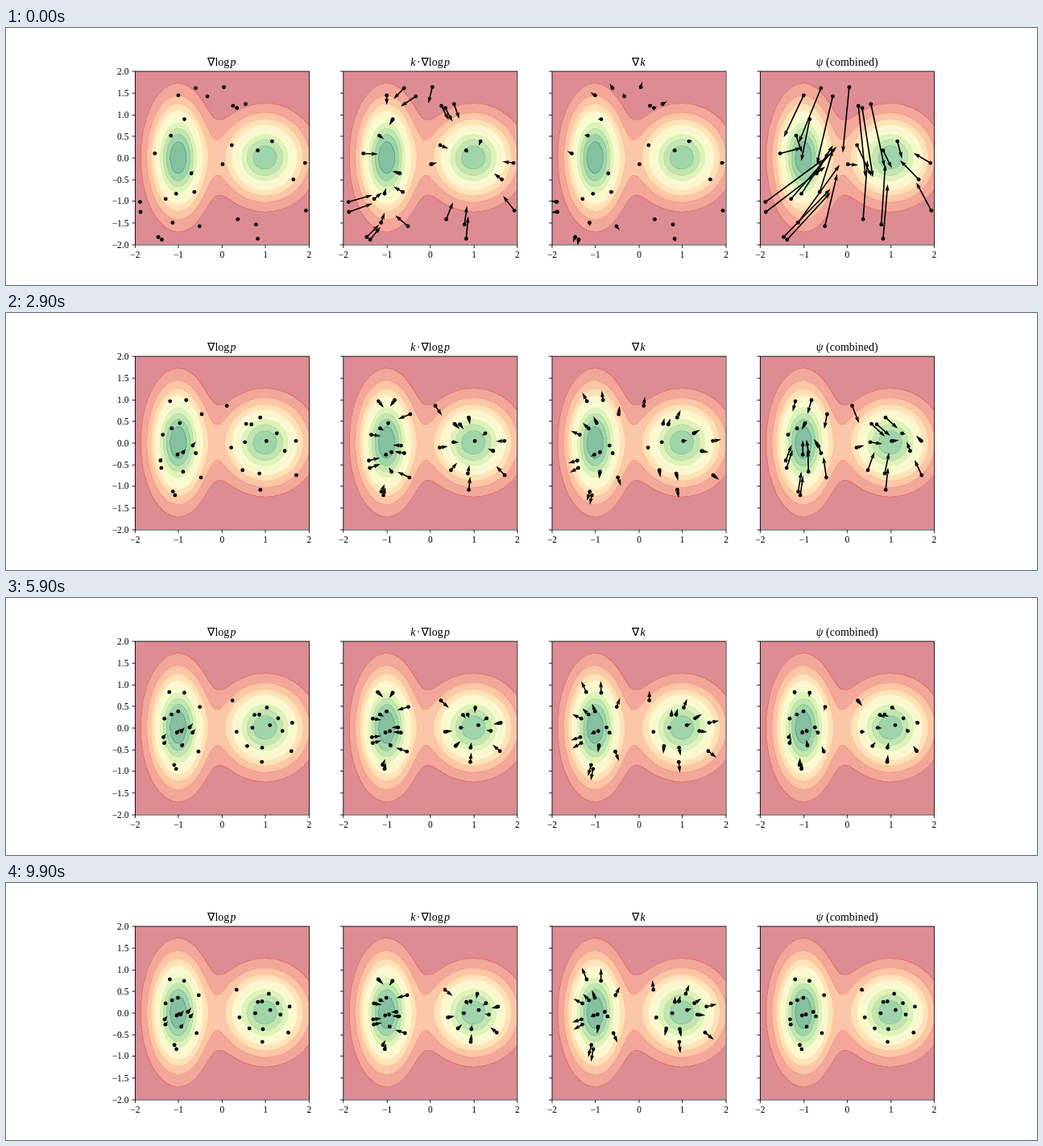
Write an HTML page with a canvas that moves like this. It is 1280 px wide and 320 px high and loops after 10000 ms.

```html
<!DOCTYPE html>
<html lang="en">
<head>
<meta charset="utf-8">
<title>Particle flow</title>
<style>
  html, body { margin: 0; width: 1280px; height: 320px; overflow: hidden; background: #fff; }
  canvas { display: block; }
</style>
</head>
<body>
<canvas id="stage" width="1280" height="320"></canvas>
<script>
const STEPS = 100, STEP_MS = 100, STEP_SIZE = 0.0031;
const BANDWIDTH = 1.1, REPULSION = 0.57;

// The figure is laid out on 1600 x 400 and shown at 80 %
const ZOOM = 0.8, SIZE = 1240 / 4.6, UNIT = SIZE / 4, GAP = SIZE * 1.2;
const LEFT = 200, TOP = 202 - SIZE / 2, ARROW = UNIT / 10, SHAFT = 0.0075 * SIZE;

const start = [
  [-1, 1.44], [-.6, 1.61], [-.33, 1.42], [.05, 1.63], [.26, 1.2], [.35, 1.15],
  [.55, 1.24], [-.86, .89], [-1.17, .51], [-1.54, .1], [.23, .29], [.83, .17],
  [1.16, .38], [1.92, -.12], [1.65, -.5], [.02, -.15], [-.7, -.36], [-.63, -.79],
  [-1.05, -.83], [-1.29, -.95], [-1.88, -1.02], [-1.87, -1.25], [-1.13, -1.5], [-.51, -1.58],
  [-1.46, -1.83], [-1.38, -1.89], [.37, -1.42], [.79, -1.54], [.83, -1.87], [1.94, -1.22]
];

// Two equally weighted Gaussians, measured in contour levels of 0.025
const gaussian = (x, y, sx, sy) =>
  Math.exp(-x * x / (2 * sx * sx) - y * y / (2 * sy * sy)) / (4 * Math.PI * sx * sy * 0.025);
const leftMode = (x, y) => gaussian(x + 1, y, .4, .8);
const rightMode = (x, y) => gaussian(x - 1, y, .6, .6);

function score([x, y]) {
  const l = leftMode(x, y), r = rightMode(x, y), w = l / (l + r);
  return [
    -w * (x + 1) / .16 - (1 - w) * (x - 1) / .36,
    -w * y / .64 - (1 - w) * y / .36
  ];
}

// Each particle is drawn by its neighbours' scores and pushed away from them
function forces(points) {
  const scores = points.map(score);
  return points.map(([x, y], i) => {
    const push = [0, 0], pull = [0, 0];
    points.forEach(([u, v], j) => {
      const dx = x - u, dy = y - v, k = Math.exp(-(dx * dx + dy * dy) / BANDWIDTH);
      push[0] += REPULSION * k * dx;
      push[1] += REPULSION * k * dy;
      pull[0] += k * scores[j][0];
      pull[1] += k * scores[j][1];
    });
    return { own: scores[i], push, total: [pull[0] + push[0], pull[1] + push[1]] };
  });
}

function simulate() {
  const states = [];
  for (let points = start; states.length < STEPS;) {
    const field = forces(points);
    states.push({ points, field });
    points = points.map(([x, y], i) => {
      const [vx, vy] = field[i].total;
      return [x + STEP_SIZE * vx, y + STEP_SIZE * vy];
    });
  }
  return states;
}

function contourImage() {
  const ramp = ['#a50026', '#d73027', '#f46d43', '#fdae61', '#fee08b', '#ffffbf',
    '#d9ef8b', '#a6d96a', '#66bd63', '#1a9850', '#006837']
    .map(hex => [1, 3, 5].map(at => parseInt(hex.slice(at, at + 2), 16)));
  const mix = (a, b) => a.map((c, i) => (c + b[i]) / 2);
  const bands = ramp.slice(1).map((c, i) => mix(c, ramp[i]));
  const tints = bands.map(c => mix(c, [255, 255, 255]));
  const pixels = Math.ceil(SIZE);
  const bandAt = (i, j) => {
    const x = (i + .5) / pixels * 4 - 2, y = 2 - (j + .5) / pixels * 4;
    return Math.floor(leftMode(x, y) + rightMode(x, y));
  };
  const canvas = document.createElement('canvas');
  canvas.width = canvas.height = pixels;
  const c = canvas.getContext('2d'), img = c.createImageData(pixels, pixels);
  for (let j = 0; j < pixels; j++) for (let i = 0; i < pixels; i++) {
    const near = [bandAt(i, j), bandAt(i + 1, j), bandAt(i, j + 1)];
    const low = Math.min(...near), high = Math.max(...near);
    // neighbouring translucent bands overlap along their seam
    const color = low === high ? tints[low] : mix(bands[high], tints[low]);
    img.data.set([...color, 255], 4 * (j * pixels + i));
  }
  c.putImageData(img, 0, 0);
  return canvas;
}

function scaledContext(canvas) {
  canvas.width = 1280;
  canvas.height = 320;
  const c = canvas.getContext('2d');
  c.scale(ZOOM, ZOOM);
  return c;
}

const SERIF = '"Liberation Serif", "Noto Serif", serif';
// Single letters are variables and set in italics
const titles = [
  ['∇log\u200a', 'p'],
  ['k', '\u200a·\u200a∇log\u200a', 'p'],
  ['∇\u200a', 'k'],
  ['ψ', ' (combined)']
];

function drawTitle(c, parts, center) {
  const setFont = text => c.font = `${text.length === 1 ? 'italic ' : ''}17.5px ${SERIF}`;
  const widths = parts.map(text => (setFont(text), c.measureText(text).width));
  let x = center - widths.reduce((a, b) => a + b) / 2;
  c.textAlign = 'left';
  parts.forEach((text, i) => {
    setFont(text);
    c.fillText(text, x, TOP - 8.3);
    x += widths[i];
  });
}

function drawBackdrop() {
  const canvas = document.createElement('canvas');
  const c = scaledContext(canvas), contours = contourImage();
  const snap = v => Math.floor(v + .5) + .5;
  const label = text => text.replace('-', '−');
  c.fillStyle = '#fff';
  c.fillRect(0, 0, 1600, 400);
  c.fillStyle = '#000';
  c.lineWidth = 1.1;
  titles.forEach((title, n) => {
    const x0 = LEFT + n * GAP, left = snap(x0), right = snap(x0 + SIZE);
    const top = snap(TOP), bottom = snap(TOP + SIZE);
    c.drawImage(contours, x0, TOP, SIZE, SIZE);
    c.strokeRect(left, top, right - left, bottom - top);
    drawTitle(c, title, x0 + SIZE / 2);
    c.font = `14.3px ${SERIF}`;
    c.beginPath();
    c.textAlign = 'center';
    for (let v = -2; v <= 2; v++) {
      const x = snap(x0 + (v + 2) * UNIT);
      c.moveTo(x, bottom);
      c.lineTo(x, bottom + 4.9);
      c.fillText(label(String(v)), x, bottom + 20);
    }
    c.textAlign = 'right';
    for (let v = -2; v <= 2; v += .5) {
      const y = snap(TOP + (2 - v) * UNIT);
      c.moveTo(left - 4.9, y);
      c.lineTo(left, y);
      if (n === 0) c.fillText(label(v.toFixed(1)), left - 10, y + 4.7);
    }
    c.stroke();
  });
  return canvas;
}

function drawArrow(x, y, [vx, vy]) {
  const length = Math.hypot(vx, vy) * ARROW;
  if (length < SHAFT) return;
  const w = SHAFT * Math.min(1, length / (5 * SHAFT));
  const neck = length - 4.5 * w, barb = length - 5 * w;
  ctx.save();
  ctx.translate(x, y);
  ctx.rotate(Math.atan2(-vy, vx));
  ctx.fillRect(0, -w / 2, neck, w);
  ctx.beginPath();
  ctx.moveTo(length, 0);
  ctx.lineTo(barb, 1.5 * w);
  ctx.lineTo(neck, 0);
  ctx.lineTo(barb, -1.5 * w);
  ctx.fill();
  ctx.restore();
}

const ctx = scaledContext(document.getElementById('stage'));
const backdrop = drawBackdrop();
const states = simulate();

// Faint upward drift in the lower half of the left mode
function drift([x, y]) {
  const s = x < -.6 && y < .1 ? Math.max(0, 1 + y) : 0;
  return [.8 * s, s];
}

const vectors = [
  (force, point) => drift(point),
  force => force.own,
  force => force.push,
  force => force.total
];

function draw({ points, field }) {
  ctx.drawImage(backdrop, 0, 0, 1600, 400);
  vectors.forEach((vector, panel) => {
    const x0 = LEFT + panel * GAP;
    ctx.save();
    ctx.beginPath();
    ctx.rect(x0, TOP, SIZE, SIZE);
    ctx.clip();
    points.forEach((point, i) => {
      const x = x0 + (point[0] + 2) * UNIT, y = TOP + (2 - point[1]) * UNIT;
      ctx.beginPath();
      ctx.arc(x, y, 3, 0, 2 * Math.PI);
      ctx.fill();
      drawArrow(x, y, vector(field[i], point));
    });
    ctx.restore();
  });
}

function tick() {
  draw(states[Math.floor(performance.now() / STEP_MS) % STEPS]);
  requestAnimationFrame(tick);
}
tick();
</script>
</body>
</html>
```
